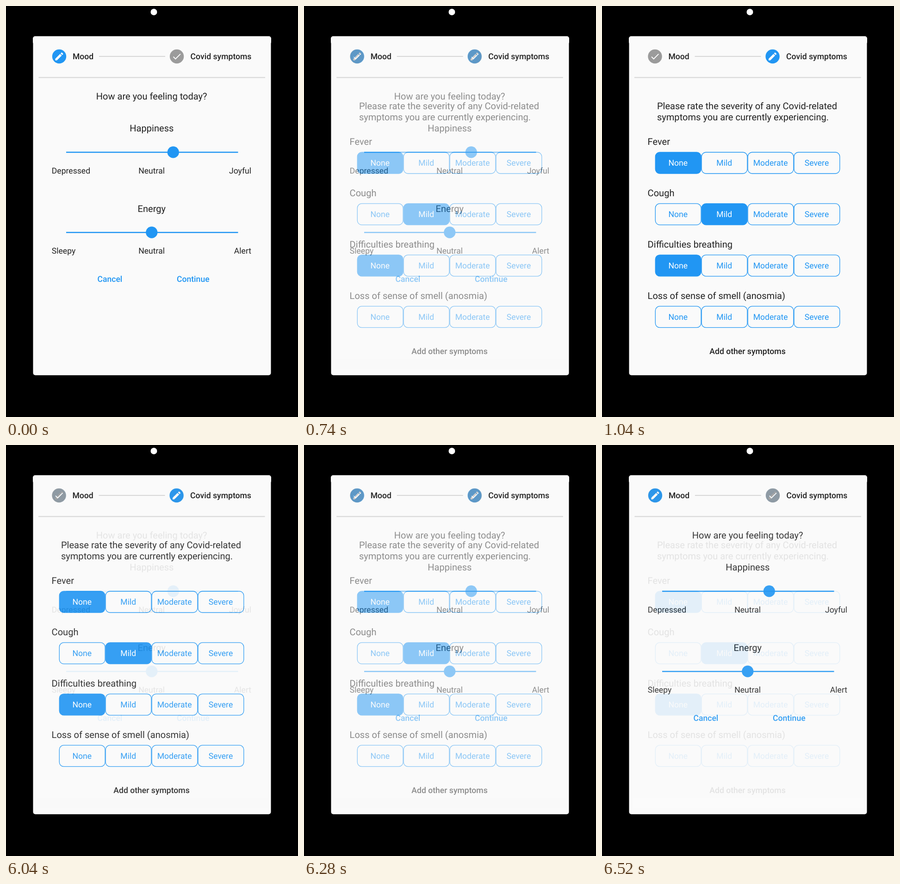
Recreate the animation shown at these times as an HTML page. Size 631 by 888 pixels, loop 6580 ms.

```html
<!DOCTYPE html>
<html lang="en">
<head>
<meta charset="utf-8">
<title>Mood and symptoms check-in</title>
<style>
  html, body { margin: 0; width: 100%; height: 100%; overflow: hidden; background: #000; }
  svg { display: block; width: 631px; height: 888px; }
  text { font-family: Roboto, "Open Sans", sans-serif; font-size: 17.6px; fill: #212121; text-rendering: geometricPrecision; }
  .large { font-size: 20.08px; }
  .medium { font-weight: 500; }
  .blue { fill: #2196f3; }
  .white { fill: #fff; }
  .middle { text-anchor: middle; }
  .end { text-anchor: end; }
</style>
</head>
<body>
<svg viewBox="0 0 631 888">
  <rect width="631" height="888"/>
  <circle cx="319.5" cy="13" r="7" fill="#fff"/>
  <rect x="58.5" y="66" width="514" height="731.7" rx="5" fill="#fafafa"/>
  <rect x="58" y="65.2" width="515" height="17.5" rx="5" fill="#fafafa"/>
  <g id="mood"></g>
  <g id="symptoms"></g>
</svg>
<script>
const BLUE = '#2196f3';
const LOOP = 6580, STEP = 60, STEPS = 10;
const FADE_IN = 500, FADE_OUT = 6040;

const PENCIL = 'M3 17.25V21h3.75L17.81 9.94l-3.75-3.75zM20.71 7.04c.39-.39.39-1.02 0-1.41l-2.34-2.34c-.39-.39-1.02-.39-1.41 0l-1.83 1.83 3.75 3.75z';
const CHECK = 'M9 16.17L4.83 12l-1.42 1.41L9 19 21 7l-1.41-1.41z';

const text = (x, y, label, classes = '') =>
  `<text x="${x}" y="${y}" class="${classes}">${label}</text>`;

const line = (x1, x2, y, color, width) =>
  `<path d="M${x1} ${y}H${x2}" stroke="${color}" stroke-width="${width}"/>`;

const badge = (x, active) =>
  `<g transform="translate(${x} 109)">
    <circle r="15.2" fill="${active ? BLUE : '#9b9b9b'}"/>
    <path transform="scale(.95) translate(-12 -12)" fill="#fff" d="${active ? PENCIL : CHECK}"/>
  </g>`;

const header = (active, dx) =>
  `<g transform="translate(${dx} 0)">` +
  badge(115, active === 0) + text(143.9, 115.3, 'Mood', 'medium') +
  line(201, 344, 108.9, '#c2c2c2', 1.3) +
  badge(369.1, active === 1) + text(398.6, 115.3, 'Covid symptoms', 'medium') +
  line(70.5, 560, 154.5, '#d6d6d6', 1.8) + '</g>';

const slider = (y, title, knob, low, high) =>
  text(314.8, y - 44.6, title, 'large middle') +
  line(130, 501.5, y, BLUE, 2.5) +
  `<circle cx="${knob}" cy="${y}" r="12.6" fill="${BLUE}"/>` +
  text(98.8, y + 46.2, low) +
  text(314.6, y + 46.2, 'Neutral', 'middle') +
  text(530.1, y + 46.2, high, 'end');

const toggle = (label, selected, active, x, y) =>
  `<rect x="${x + .6}" y="${y}" width="98.8" height="46" rx="9.5" stroke="${BLUE}" stroke-width="1.3" fill="${active ? BLUE : 'none'}"/>` +
  text(x + 49.6, y + 29.4, label, active ? 'white middle' : 'blue middle');

const question = (row, title, selected) => {
  const y = 316 + row * 110.9;
  return text(98.6, y - 15.7, title, 'large') +
    ['None', 'Mild', 'Moderate', 'Severe']
      .map((label, i) => toggle(label, selected, i === selected, 114.7 + i * 99.9, y)).join('');
};

const mood = document.getElementById('mood');
const symptoms = document.getElementById('symptoms');

mood.innerHTML = header(0, 0) +
  text(314.6, 202.2, 'How are you feeling today?', 'large middle') +
  slider(315.9, 'Happiness', 361.3, 'Depressed', 'Joyful') +
  slider(489.2, 'Energy', 314.8, 'Sleepy', 'Alert') +
  text(224.4, 595.6, 'Cancel', 'medium blue middle') +
  text(404.3, 595.6, 'Continue', 'medium blue middle');

symptoms.innerHTML =
  '<rect x="66" y="84" width="500" height="700" fill="#fafafa"/>' +
  header(1, -.5) +
  text(118.9, 222.7, 'Please rate the severity of any Covid-related', 'large') +
  text(118.9, 246.8, 'symptoms you are currently experiencing.', 'large') +
  question(0, 'Fever', 0) +
  question(1, 'Cough', 1) +
  question(2, 'Difficulties breathing', 0) +
  question(3, 'Loss of sense of smell (anosmia)', -1) +
  text(314.5, 751.8, 'Add other symptoms', 'medium middle');

// Share of a stepped cross-fade that is done at time t.
const faded = (t, start) =>
  t < start ? 0 : Math.min(STEPS, Math.floor((t - start) / STEP) + 1) / STEPS;

function render(t) {
  symptoms.setAttribute('opacity', (faded(t, FADE_IN) - faded(t, FADE_OUT)).toFixed(2));
}

const start = performance.now();
function tick() {
  render((performance.now() - start) % LOOP);
  requestAnimationFrame(tick);
}
tick();
</script>
</body>
</html>
```
